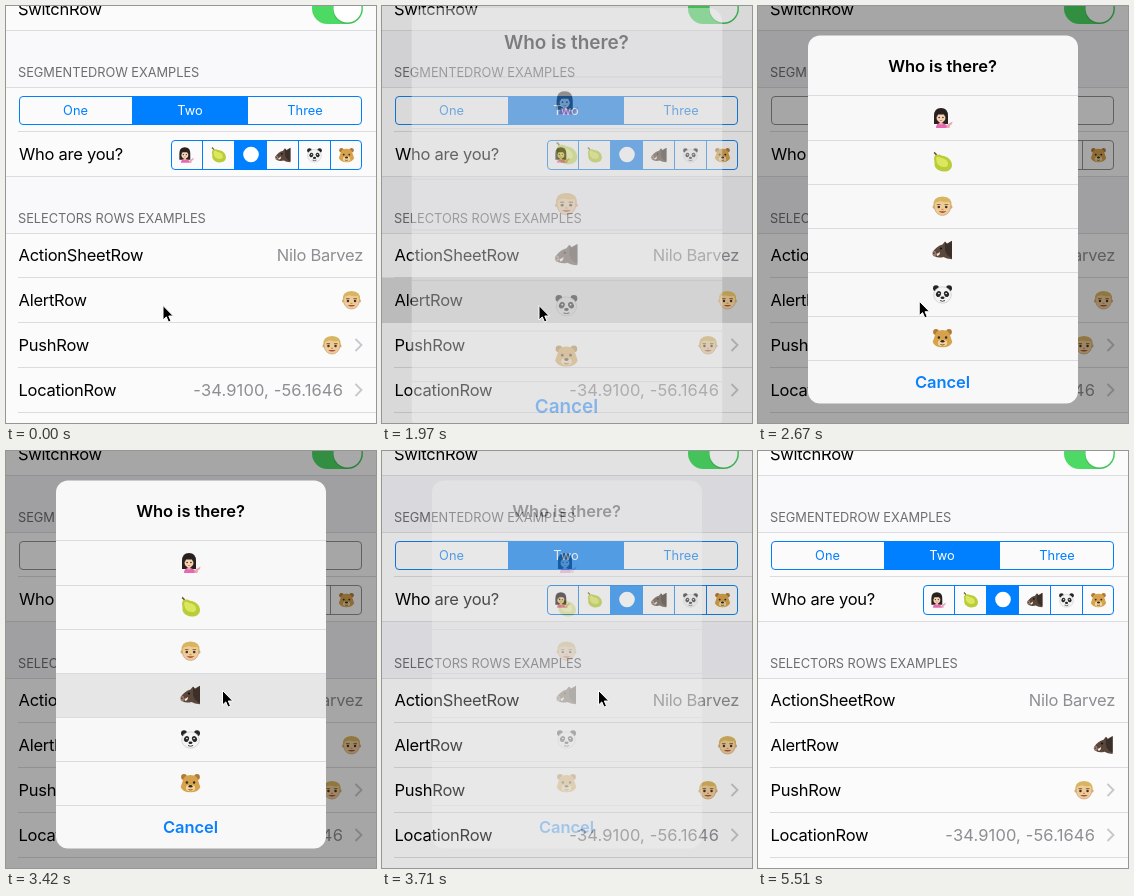
Animation of 370x417 px, one loop 5970 ms. Source, as an HTML page:

```html
<!DOCTYPE html>
<html lang="en">
<head>
<meta charset="utf-8">
<title>Form rows</title>
<style>
  html, body { margin: 0; width: 100%; height: 100%; overflow: hidden; background: #fbfbfc; }
  svg { display: block; width: 100vw; height: 100vh; }
  text { font-family: Inter, Roboto, sans-serif; font-size: 16.5px; letter-spacing: -.25px; fill: #000; }
  .head { font-size: 12.8px; letter-spacing: -.03px; fill: #6d6d72; }
  .value { fill: #8e8e93; text-anchor: end; }
  .coord { letter-spacing: .13px; }
  .seg { font-size: 12.8px; letter-spacing: 0; text-anchor: middle; fill: var(--tint); }
  .seg.on { fill: #fff; }
  .bold { font-weight: 600; letter-spacing: -.05px; text-anchor: middle; }
  .tint { fill: var(--tint); }
  .outline { fill: none; stroke: var(--tint); }
  .line { stroke: #dcdce0; }
  .chevron { fill: none; stroke: #c7c7cc; stroke-width: 1.8; }
</style>
</head>
<body>
<svg id="stage" viewBox="0 0 370 417" preserveAspectRatio="none" xmlns="http://www.w3.org/2000/svg">
  <defs>
    <!-- emoji, centred on 0,0 in a 20 unit box -->
    <g id="woman">
      <path d="M-8.500 6V-2Q-8.500-10-1.500-10T5.500-2V6Z" fill="#29211f"/>
      <path d="M-6.500 10Q-6.500 5-1.500 5T6 10Z" fill="#e667b4"/>
      <path d="M-3 3H0V6.500H-3Z" fill="#e2b694"/>
      <ellipse cx="-1.500" cy="-.5" rx="4.500" ry="5" fill="#f5d3b5"/>
      <path d="M-6.300 0Q-6.500-7-1.500-7.500 3.500-7 3.300 0 2-2.500 1.500-3.500H-4.500Q-5-2-6.300 0Z" fill="#29211f"/>
      <circle cx="-3.400" cy="-.5" r=".8" fill="#33231d"/>
      <circle cx=".4" cy="-.5" r=".8" fill="#33231d"/>
      <path d="M-3 2.200Q-1.500 3.700 0 2.200Z" fill="#c6455a"/>
      <path d="M3.500 10 5 6.500 10 3.500 9.500 6 7.500 7.500 7 10Z" fill="#eba6b4"/>
    </g>
    <g id="pear">
      <path d="M-6-6.500Q-6.500-8.500-8.500-9.500" fill="none" stroke="#76512b" stroke-width="1.600"/>
      <path d="M-8.300-4.500C-7.500-8-3-8-.5-6.300 5-6 9.500-2 9.500 3 9.500 8 5 9.800 1 9.500-5 9-8.500 5.500-8 1-7.800-1.500-9-2.500-8.300-4.500Z" fill="#b9cd38"/>
      <path d="M-6.500-4C-5.500-6-3-5.500-1.500-4 4-3.500 6 0 5.500 3 4.500 6.500-3.500 5.500-5.500 1Z" fill="#dde65f"/>
    </g>
    <g id="boy">
      <circle cx="-8.300" cy="1" r="1.700" fill="#d9ab78"/>
      <circle cx="8.300" cy="1" r="1.700" fill="#d9ab78"/>
      <path d="M-8.300-1Q-8-8 0-8T8.300-1C8.300 6 4.500 9.300 0 9.300S-8.300 6-8.300-1Z" fill="#eecb98" stroke="#c49a66" stroke-width=".7"/>
      <path d="M-9 0Q-10-9.300 0-9.500 10-9.300 9 0 7.500-1 7-4.500 2-3-2-5-5.500-4-7-3.500-7.500 0-9 0Z" fill="#d8b560"/>
      <path d="M-5.700-1.500H-2M2-1.500H5.700" stroke="#94713a" stroke-width="1.200"/>
      <circle cx="-3.700" cy="1" r="1.300" fill="#40302a"/>
      <circle cx="3.700" cy="1" r="1.300" fill="#40302a"/>
      <path d="M-1 3.500H1" stroke="#c69363" stroke-width="1.300"/>
      <path d="M-4 5.300Q0 8.500 4 5.300Z" fill="#a3503c"/>
    </g>
    <g id="boar">
      <path d="M-9.800 2C-7-2-4-4.500 0-5.500L2.500-8.500 4.500-6.500 9.500-9.300V9.300Q4 9 1 7-4 8.500-8.500 6Z" fill="#5a463a"/>
      <path d="M2.500-8 4.500-5.500 9.500-9V8Q4 6 2.500 0Z" fill="#3b2f29"/>
      <ellipse cx="-8.200" cy="3.500" rx="1.900" ry="2.700" fill="#9c7a6d"/>
      <circle cx="-8.600" cy="3.200" r=".7" fill="#3b2925"/>
      <circle cx="-1.500" cy="-1.500" r="1.100" fill="#171211"/>
      <path d="M-5.500 6Q-2.300 5.500-2.600 2-4.500 4-6 3.800Z" fill="#f4eedf"/>
    </g>
    <g id="panda">
      <circle cx="-6.500" cy="-5.800" r="3" fill="#242424"/>
      <circle cx="6.500" cy="-5.800" r="3" fill="#242424"/>
      <ellipse cy="1" rx="8.800" ry="8.200" fill="#f4f4f4" stroke="#c7c7c7" stroke-width=".7"/>
      <ellipse cx="-4" cy="0" rx="2.400" ry="3" transform="rotate(28 -4 0)" fill="#282828"/>
      <ellipse cx="4" cy="0" rx="2.400" ry="3" transform="rotate(-28 4 0)" fill="#282828"/>
      <circle cx="-3.600" cy="-.5" r=".8" fill="#fff"/>
      <circle cx="3.600" cy="-.5" r=".8" fill="#fff"/>
      <ellipse cy="3.700" rx="2" ry="1.300" fill="#242424"/>
      <path d="M-2.500 6.500Q0 8 2.500 6.500" fill="none" stroke="#444"/>
    </g>
    <g id="bear">
      <circle cx="-6.500" cy="-6" r="2.900" fill="#b07a35"/>
      <circle cx="6.500" cy="-6" r="2.900" fill="#b07a35"/>
      <path d="M-7.800-2Q-7-8 0-8T7.800-2L9.800 4Q8 9.300 0 9.300T-9.800 4Z" fill="#d6a24c"/>
      <ellipse cy="5" rx="4.700" ry="3.300" fill="#efd59c"/>
      <circle cx="-3.600" cy="-.5" r="1.200" fill="#39271b"/>
      <circle cx="3.600" cy="-.5" r="1.200" fill="#39271b"/>
      <ellipse cy="3.300" rx="2" ry="1.300" fill="#39271b"/>
      <path d="M-2 6.500Q0 7.600 2 6.500" fill="none" stroke="#79522c"/>
    </g>
  </defs>
  <g id="form"></g>
  <rect id="dim" width="370" height="417"/>
  <g id="alert"></g>
  <path id="cursor" d="M0 0V14.500L3.300 11.400 5.500 16.600 8 15.500 5.800 10.500H10.300Z" stroke="#fff"/>
</svg>
<script>
const LOOP = 5970, STEP = 56.67;
const KINDS = ['woman', 'pear', 'boy', 'boar', 'panda', 'bear'];
const $ = id => document.getElementById(id);

const text = (s, x, y, cls = '') => `<text x="${x}" y="${y}" class="${cls}">${s}</text>`;
const rule = (y, x = 0, w = 370) => `<path class="line" d="M${x} ${y + .5}H${x + w}"/>`;
const emoji = (kind, x, y, k = 1, id = '') =>
  `<use ${id && `id="${id}"`} href="#${kind}" transform="translate(${x} ${y}) scale(${k})"/>`;
const chevron = y => `<path class="chevron" d="M349.500 ${y - 6}l6 6-6 6"/>`;

function segments(y, h, edges, on) {
  const first = edges[0], last = edges[edges.length - 1];
  const bars = edges.slice(1, -1).map(x => `M${x + .5} ${y}v${h}`).join('');
  return `<rect class="tint" x="${edges[on]}" y="${y}" width="${edges[on + 1] - edges[on]}" height="${h}"/>
    <rect class="outline" x="${first + .5}" y="${y + .5}" width="${last - first - 1}" height="${h - 1}" rx="3.500"/>
    <path class="outline" d="${bars}"/>`;
}

function buildForm() {
  const seats = [180, 212.5, 245, 277, 308.5, 340.5];
  const rows = ['ActionSheetRow', 'AlertRow', 'PushRow', 'LocationRow'];
  $('form').innerHTML =
    '<rect width="370" height="417" fill="#fbfbfc"/>' +
    '<path id="bands" d="M0 24H370V82H0ZM0 170H370V228H0Z"/>' +
    [24, 81, 170, 227].map(y => rule(y)).join('') +
    [125, 271, 316, 361, 406].map(y => rule(y, 12)).join('') +
    '<rect id="pressed" y="271.500" width="370" height="45.500" fill="#d9d9d9"/>' +
    text('SwitchRow', 12, 8.5) +
    '<rect x="306" y="-13" width="51" height="31" rx="15.500" fill="#4cd964"/>' +
    '<circle cx="341.500" cy="3.500" r="14.500" fill="#000" opacity=".12"/>' +
    '<circle cx="341.500" cy="2.500" r="14" fill="#fff"/>' +
    text('SEGMENTEDROW EXAMPLES', 12, 71, 'head') +
    segments(90, 29, [13, 126, 241, 356], 1) +
    text('One', 69.5, 108.5, 'seg') + text('Two', 184, 108.5, 'seg on') + text('Three', 299, 108.5, 'seg') +
    text('Who are you?', 13, 154) +
    segments(134, 30, [165, 196, 228, 260, 292, 324, 356], 2) +
    KINDS.map((k, i) => i === 2
      ? `<circle cx="${seats[i]}" cy="148.500" r="7.800" fill="#fff"/>`
      : emoji(k, seats[i], 149, .78)).join('') +
    text('SELECTORS ROWS EXAMPLES', 12, 217, 'head') +
    rows.map((s, i) => text(s, 12.5, 255 + 45 * i)).join('') +
    text('Nilo Barvez', 357, 255, 'value') +
    emoji('boy', 345.5, 294, .96, 'choice') +
    emoji('boy', 326, 339, .96) +
    text('-34.9100, -56.1646', 337, 390, 'value coord') +
    chevron(339) + chevron(384);
}

function buildAlert() {
  $('alert').innerHTML =
    '<rect x="50" y="29.500" width="270" height="368" rx="12" fill="#f8f8f8"/>' +
    '<rect id="tapped" x="50" y="222.500" width="270" height="44" fill="#e6e6e6"/>' +
    [89, 134, 178, 222, 266, 310, 354].map(y => rule(y, 50, 270)).join('') +
    text('Who is there?', 184.5, 65.5, 'bold') +
    KINDS.map((k, i) => emoji(k, 184.5, 112 + 44 * i)).join('') +
    '<g style="--tint:#0a80ff">' + text('Cancel', 184.5, 382, 'bold tint') + '</g>';
}

// piecewise linear value through [time, value] pairs
function track(t, keys) {
  if (t <= keys[0][0]) return keys[0][1];
  for (let i = 1; i < keys.length; i++) {
    const [a, u] = keys[i - 1], [b, v] = keys[i];
    if (t < b) return u + (v - u) * (t - a) / (b - a);
  }
  return keys[keys.length - 1][1];
}

const tick = (t, from) => from + Math.floor((t - from) / STEP + .02) * STEP;

function alertLevel(t) {
  if (t < 1970 || t >= 3940) return 0;
  if (t < 3540) return track(tick(t, 1970), [[1970, .4], [2027, .8], [2084, .93], [2141, .97], [2305, 1]]);
  return track(tick(t, 3540), [[3540, .95], [3597, .8], [3653, .53], [3710, .3], [3767, .17], [3823, .09], [3880, .04], [3937, 0]]);
}

function cursorAt(t) {
  const a = [157, 299.5], b = [216.5, 239.5], c = [231.5, 284.5];
  const glide = (p, q, from, n, pow = 1) => {
    const k = Math.min(1, (Math.floor((t - from) / STEP + .02) + 1) / n) ** pow;
    return p.map((v, i) => v + (q[i] - v) * k);
  };
  if (t < 2670) return a;
  if (t < 4280) return glide(a, b, 2670, 9, 1.2);
  if (t < 4920) return glide(b, c, 4280, 8);
  if (t < 4980) return [286.5, 290];
  if (t >= 5340 && t < 5510) return glide([335, 409], [364, 413], 5340, 4);
  return null;
}

function tintFor(gray) {
  const from = [0, 128, 255];
  return `rgb(${from.map(v => Math.round(v + (146 - v) * gray)).join()})`;
}

function draw(t) {
  const level = alertLevel(t);
  const k = t < 3000 ? 1 + .25 * (1 - level) : 1;
  $('form').style.setProperty('--tint', tintFor(level ** 2));
  $('bands').setAttribute('fill', level > 0 ? '#f2f2f6' : '#f9f9fb');
  $('pressed').setAttribute('opacity', t < 1800 ? 0 : track(t, [[2084, 1], [2310, 0]]));
  $('choice').setAttribute('href', t < 4050 ? '#boy' : '#boar');
  $('dim').setAttribute('opacity', .34 * level);
  $('alert').setAttribute('opacity', level);
  $('alert').setAttribute('transform', `translate(185 213.500) scale(${k}) translate(-185 -213.500)`);
  $('tapped').setAttribute('opacity', t >= 3420 && t < 3590 ? 1 : 0);
  const at = cursorAt(t);
  $('cursor').setAttribute('visibility', at ? 'visible' : 'hidden');
  if (at) $('cursor').setAttribute('transform', `translate(${at})`);
}

buildForm();
buildAlert();
const start = performance.now();
function loop() {
  draw((performance.now() - start) % LOOP);
  requestAnimationFrame(loop);
}
loop();
</script>
</body>
</html>
```
